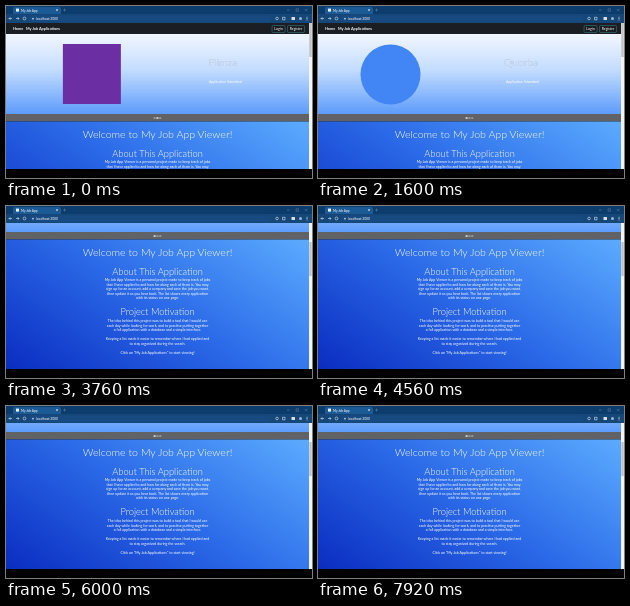
Write an HTML page that moves like this. It is 306x172 px and loops after 8 s.

```html
<!DOCTYPE html>
<html lang="en">
<head>
<meta charset="utf-8">
<title>My Job App Viewer</title>
<style>
html, body { margin: 0; width: 100%; height: 100%; overflow: hidden; background: #000; }
svg { display: block; width: 100%; height: 100%; }
text { font-family: Lato, "Open Sans", sans-serif; fill: #fff; }
.mid { text-anchor: middle; }
.small { font-size: 3.4px; }
.light { font-weight: 300; }
.name { font-size: 10.5px; font-weight: 300; filter: drop-shadow(.5px .6px .4px #5577a8); }
</style>
</head>
<body>
<svg viewBox="0 0 306 172">
  <defs>
    <linearGradient id="sky" x1="0" y1="0" x2="0" y2="1">
      <stop offset="0" stop-color="#f2f7ff"/>
      <stop offset=".45" stop-color="#c3dcff"/>
      <stop offset="1" stop-color="#5c9cfb"/>
    </linearGradient>
    <linearGradient id="deep" gradientUnits="userSpaceOnUse" x1="76" y1="297" x2="230" y2="65">
      <stop offset="0" stop-color="#0a2cc0"/>
      <stop offset=".5" stop-color="#2b6ae8"/>
      <stop offset="1" stop-color="#5cacff"/>
    </linearGradient>
    <clipPath id="view"><rect y="17" width="306" height="146"/></clipPath>
    <clipPath id="stage"><rect y="28" width="303" height="80"/></clipPath>
  </defs>

  <g clip-path="url(#view)">
    <g id="page">
      <rect y="17" width="306" height="11" fill="#1b1e22"/>
      <text x="7" y="24.2" font-size="3.8" font-weight="bold">Home</text>
      <text x="20" y="24.2" font-size="3.8" font-weight="bold">My Job Applications</text>
      <g fill="none" stroke="#3f8590" stroke-width=".5">
        <rect x="266" y="19.5" width="13" height="7" rx="1"/>
        <rect x="281.5" y="19.5" width="17" height="7" rx="1"/>
      </g>
      <text class="mid" x="272.5" y="24.2" font-size="3.5">Login</text>
      <text class="mid" x="290" y="24.2" font-size="3.5">Register</text>

      <rect y="28" width="306" height="80" fill="url(#sky)"/>
      <g clip-path="url(#stage)">
        <g id="leaving">
          <rect x="42" y="38" width="58" height="60" fill="#6b2fa3"/>
          <text class="mid name" x="202" y="59.5">Plimza</text>
          <text class="mid small" x="204.5" y="77">Application Submitted</text>
        </g>
        <g id="entering">
          <circle cx="72.5" cy="68.5" r="30" fill="#4285f4"/>
          <text class="mid name" x="203" y="59.5">Quorba</text>
          <text class="mid small" x="204.5" y="77">Application Submitted</text>
        </g>
      </g>
      <rect y="108" width="306" height="7.5" fill="#606266"/>
      <g id="dots" fill="#fff">
        <rect x="147.6" y="111.4" width="2" height="1.3"/>
        <rect x="150.4" y="111.4" width="2" height="1.3"/>
        <rect x="153.2" y="111.4" width="2" height="1.3"/>
      </g>

      <rect y="115.5" width="306" height="130" fill="url(#deep)"/>
      <g id="copy"></g>
    </g>
    <rect x="303" y="17" width="3" height="146" fill="#f4f4f4"/>
    <rect id="thumb" x="303.3" y="17" width="2.4" height="34" fill="#c1c1c1"/>
  </g>

  <rect width="306" height="8" fill="#0c3c6c"/>
  <rect y="8" width="306" height="9" fill="#164779"/>
  <path d="M7 8V3q0-2 2-2H53q2 0 2 2V8z" fill="#1c5a96"/>
  <rect x="10" y="2.6" width="3" height="3" fill="#e8f4f4"/>
  <text x="15" y="5.6" font-size="3.2">My Job App</text>
  <g fill="none" stroke="#dce8f4" stroke-width=".6">
    <path d="M50 3l2 2m0-2l-2 2"/>
    <path d="M57 4h3m-1.5-1.5v3M281 4h2.500M290 2.800h2.400v2.400H290zM299 2.800l2.400 2.400m0-2.400l-2.400 2.400" opacity=".35"/>
    <path d="M6 12.500H3m1.300-1.300L3 12.500l1.300 1.300M10 12.500h3m-1.300-1.300l1.300 1.300-1.300 1.300"/>
    <circle cx="18.500" cy="12.500" r="1.400"/>
  </g>
  <rect x="23" y="9.500" width="242" height="6.500" rx="3.200" fill="#174a80"/>
  <circle cx="27" cy="12.700" r=".9" fill="#b9cbdc"/>
  <text x="30" y="13.900" font-size="3.400">localhost:3000</text>
  <g fill="none" stroke="#dce8f4" stroke-width=".6">
    <circle cx="271" cy="12.500" r="1.300"/>
    <path d="M276.500 11.300h2.500v2.500h-2.500z"/>
  </g>
  <rect x="285.500" y="11" width="3.500" height="3" fill="#d8dde6"/>
  <circle cx="294.500" cy="12.500" r="1.500" fill="#9fb6d0"/>
  <path d="M301 10.800v.8m0 .6v.8m0 .6v.8" stroke="#fff" stroke-width=".8"/>
  <rect y="163" width="306" height="9" fill="#000"/>
</svg>
<script>
const LOOP = 8000, STEP = 80, WIDTH = 306, SCROLL = 82;
const $ = id => document.getElementById(id);
const clamp = v => Math.min(1, Math.max(0, v));
const ease = p => p * p * (3 - 2 * p);
const span = (t, start, length) => clamp((t - start) / length);
const move = (id, x, y) => $(id).setAttribute('transform', `translate(${x} ${y})`);

function addLine(str, y, size, style = '') {
  const el = document.createElementNS('http://www.w3.org/2000/svg', 'text');
  el.setAttribute('class', `mid ${style}`);
  el.setAttribute('x', 151.5);
  el.setAttribute('y', y);
  el.setAttribute('font-size', size);
  el.textContent = str;
  $('copy').append(el);
}

function addLines(y, lines) {
  lines.forEach((str, i) => addLine(str, y + i * 4.5, 3.6));
}

addLine('Welcome to My Job App Viewer!', 132.3, 10.6, 'light');
addLine('About This Application', 151.2, 9.3, 'light');
addLines(157.4, [
  'My Job App Viewer is a personal project made to keep track of jobs',
  'that I have applied to and how far along each of them is. You may',
  'sign up for an account, add a company and save the job you want,',
  'then update it as you hear back. The list shows every application',
  'with its status on one page.'
]);
addLine('Project Motivation', 191.2, 9.3, 'light');
addLines(198.4, [
  'The idea behind this project was to build a tool that I would use',
  'each day while looking for work, and to practise putting together',
  'a full application with a database and a simple interface.'
]);
addLines(216.4, [
  'Keeping a list made it easier to remember where I had applied and',
  'to stay organized during the search.'
]);
addLine('Click on "My Job Applications" to start viewing!', 230.2, 3.6);

function draw(ms) {
  const t = Math.floor(ms % LOOP / STEP) * STEP;
  const slide = WIDTH * ease(span(t, -76, 570));
  const scroll = SCROLL * ease(span(t, 2520, 550));

  move('leaving', slide, 0);
  move('entering', slide - WIDTH, 0);
  move('page', 0, -scroll);
  move('thumb', 0, scroll * 34 / 146);

  const active = slide < WIDTH / 2 ? 1 : 0;
  [...$('dots').children].forEach((dot, i) => dot.setAttribute('opacity', i === active ? 1 : .5));
}

const began = performance.now();
function tick() {
  draw(performance.now() - began);
  requestAnimationFrame(tick);
}
tick();
</script>
</body>
</html>
```
